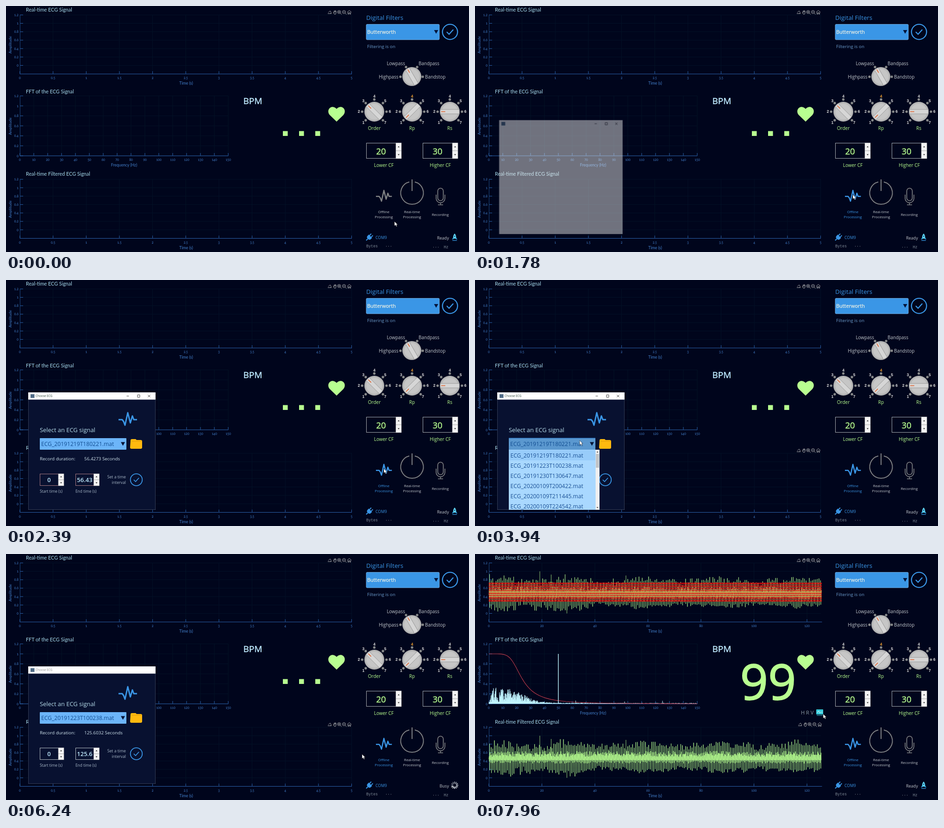
An HTML page that plays this animation: 1000x532 px, repeating every 8 s.

```html
<!DOCTYPE html>
<html lang="en">
<head>
<meta charset="utf-8">
<title>ECG monitor</title>
<style>
html, body { margin: 0; width: 100%; height: 100%; overflow: hidden; background: #00051c; }
svg { display: block; width: 100vw; height: 100vh; font-family: "Open Sans", "Noto Sans", sans-serif; }
.axis { font-family: Lato, "Noto Sans", sans-serif; font-variant-numeric: oldstyle-nums; }
.num { font: bold 8.5px "Liberation Sans", Arial, sans-serif; }
.mono { font-family: "Liberation Mono", monospace; }
#cursor { animation: cursor 8s linear infinite; }
#win { transform-origin: 185.5px 370px; animation: open 8s step-end infinite; }
#spin { transform-origin: 969px 500px; animation: spin .92s steps(12) infinite; }
#hover { animation: hover 8s step-end infinite; }
@keyframes cursor {
  0%, .8% { transform: translate(839px, 466px); }
  .9%, 2% { transform: translate(839.5px, 466.5px); }
  4.5% { transform: translate(834px, 444px); }
  8.375%, 10.3% { transform: translate(809px, 401px); }
  10.375%, 35% { transform: translate(816px, 408px); }
  38% { transform: translate(690px, 398px); }
  42% { transform: translate(380px, 366px); }
  44.5%, 49.25% { transform: translate(226px, 347px); }
  53% { transform: translate(212px, 372px); }
  58.875%, 61% { transform: translate(196px, 400px); }
  66%, 70% { transform: translate(281px, 432px); }
  73% { transform: translate(440px, 436px); }
  77%, 98.45% { transform: translate(769px, 433px); }
  98.5%, 99.45% { transform: translate(764px, 400px); }
  99.5%, 100% { transform: translate(752px, 346px); }
}
@keyframes open {
  0% { opacity: 0; transform: scale(.95); }
  22.25% { opacity: .47; transform: scale(.97); }
  23.25% { opacity: .85; transform: scale(.99); }
  24.25%, 100% { opacity: 1; transform: none; }
}
@keyframes hover {
  0% { transform: none; }
  56.5%, 100% { transform: translateY(22px); }
}
@keyframes spin { to { transform: rotate(360deg); } }
</style>
</head>
<body>
<script>
const LOOP = 8000;
const C = { blue: '#3a96e6', green: '#b8ff90', pale: '#bfeaff', gray: '#808284', text: '#c3c8cd',
            line: '#2c62ad', tick: '#4380cc', grid: '#05152a', body: '#081130' };

let seed = 7;
const rnd = () => (seed = (seed * 16807) % 2147483647) / 2147483647;
const range = (n, fn) => Array.from({ length: n }, (_, i) => fn(i)).join('');

const text = (x, y, s, size, fill = C.text, anchor = 'start', more = '') =>
  `<text x="${x}" y="${y}" font-size="${size}" fill="${fill}" text-anchor="${anchor}" xml:space="preserve" ${more}>${s}</text>`;
const mid = (x, y, s, size, fill, more) => text(x, y, s, size, fill, 'middle', more);
const heavy = (color, w) => `stroke="${color}" stroke-width="${w}"`;
const path = (d, stroke, w = 1, more = '') =>
  `<path d="${d}" fill="none" stroke="${stroke}" stroke-width="${w}" ${more}/>`;
const rect = (x, y, w, h, fill, more = '') =>
  `<rect x="${x}" y="${y}" width="${w}" height="${h}" fill="${fill}" ${more}/>`;
const circle = (x, y, r, fill, more = '') => `<circle cx="${x}" cy="${y}" r="${r}" fill="${fill}" ${more}/>`;
const at = (x, y, s, k = 1) => `<g transform="translate(${x} ${y}) scale(${k})">${s}</g>`;
// spans: "from-to from-to" in ms
const show = (spans, s) => `<g data-show="${spans}">${s}</g>`;

// Plots
const yAxis = (top, bottom, zero, unit, right) => path(`M30.5 ${top}V${bottom}`, C.line) +
  range(7, i => {
    const y = zero - unit * i * .2;
    return path(`M31 ${y}H${right}`, C.grid, .8) + path(`M30 ${y}h7`, C.line) +
      text(27, y + 2.5, +(i * .2).toFixed(1), 7, C.tick, 'end');
  }) + mid(0, 0, 'Amplitude', 8.3, C.tick, `transform="translate(12 ${(top + bottom) / 2 + 1}) rotate(-90)"`);
const xAxis = (top, bottom, right, n, step, dx) => path(`M30 ${bottom}H${right}`, C.line) +
  range(n, i => {
    const x = 30 + dx * i;
    return path(`M${x} ${top}V${bottom}`, C.grid, .8) + path(`M${x} ${bottom}v-6`, C.line) +
      mid(x, bottom + 11, +(i * step).toFixed(1), 7, C.tick);
  });
const title = (y, s) => text(43, y, s, 10.8, '#a9dcec');

const timeAxes = (top, title_, changeAt) => title(top - 7.3, title_) +
  yAxis(top, top + 128, top + 109.5, 91, 747) +
  show(`0-${changeAt}`, xAxis(top, top + 128, 747, 11, .5, 71.65)) +
  show(`${changeAt}-${LOOP}`, xAxis(top, top + 128, 749.5, 7, 20, 114.5)) +
  mid(389, top + 151, 'Time (s)', 8.8, C.tick);

function ecg(zero) {
  let d = '';
  for (let x = 30; x < 747; x += 3.47) {
    const wild = x < 230 ? .14 : .03;
    const swell = .03 * Math.sin(x / 26) + .02 * Math.sin(x / 9);
    const peak = .85 + swell - .16 * rnd() + (rnd() - .5) * wild;
    const dip = .16 - swell + .1 * rnd() - rnd() * wild;
    const wave = [.44, .5 + .08 * rnd(), .4 - .06 * rnd(), peak, dip, .54 + .1 * rnd(), .42];
    wave.forEach((v, i) => d += `${d ? 'L' : 'M'}${(x + i * .5).toFixed(1)} ${(zero - 91 * v).toFixed(1)}`);
  }
  return d;
}
const burst = zero => path(`M140 ${zero - 40}V${zero - 91}M198.5 ${zero - 40}V${zero}M164.5 ${zero - 40}V${zero - 84}M326 ${zero - 40}V${zero - 82}`, C.green, .8);

function rawSignal() {
  let bars = '';
  for (let x = 30.5; x < 749; x += 2.3) bars += `M${x.toFixed(1)} 62V103`;
  const rows = range(6, i => `M30 ${62.5 + i * 8}H749`);
  return path(ecg(128.5), C.green, .75) + burst(128.5) +
    path(bars, '#f00808', 1.4, 'stroke-dasharray="4 1.2"') +
    path(rows, '#f00808', 1.1, 'stroke-dasharray="3 1.2"') +
    path('M30 82.5H749M30 92H749', '#c4d860', 1, 'opacity=".85"') +
    path('M30 80H749', '#9ccc60', 4, 'stroke-dasharray=".7 2.77" opacity=".7"');
}

function spectrum() {
  const hump = (f, c, w, h) => h * Math.exp(-(((f - c) / w) ** 2));
  let d = 'M30 323', curve = '';
  for (let f = 0; f <= 150; f += .1) {
    const env = hump(f, 3.6, 1.3, .38) + hump(f, 5.6, .9, .22) + hump(f, 1.5, .6, .18) +
      (f > 7.5 ? hump(f, 10, 14, .21) + hump(f, 21, 14, .09) : .02) + .008 + .02 * Math.exp(-f / 50);
    d += `L${(30 + f * 3).toFixed(1)} ${(323.5 - 108 * env * (.12 + .95 * rnd() ** 2.6)).toFixed(1)}V323.5`;
  }
  for (let f = 0; f <= 150; f += 1.5)
    curve += `${f ? 'L' : 'M'}${30 + f * 3} ${(324 - 108 / Math.sqrt(1 + (f / 20) ** 6)).toFixed(1)}`;
  return path(d, '#c2f5ff', .8) + path('M217.5 324V317M323 324V319M405 324V317.5', '#c2f5ff') +
    path(curve, '#c23c4c', 1.1) + path('M180 324V216', '#c2f5ff', 1.4);
}

const toolbar = (x, y) => at(x, y, path(
  'M-4 3H4M-3 1L1-3L3 0M3 3V0' +
  'M8 0L10 4H13L14.5-1M9.5 1V-3M11 0V-4M12.5 0V-4M14-1V-3' +
  'M23 2L26 5M18.5-.5H22.5M20.5-2.5V1.5M33.5 2L36.5 5M29-.5H33' +
  'M38 0L42.5-4L47 0M39.5 0V4H41.5V1H43.5V4H45.5V0', '#a6a8aa', 1) +
  circle(20.5, -.5, 3.4, 'none', 'stroke="#a6a8aa"') + circle(31, -.5, 3.4, 'none', 'stroke="#a6a8aa"'));

// Controls
const check = (x, y, r) => circle(x, y, r, 'none', `stroke="${C.blue}" stroke-width="${r / 7}"`) +
  at(x, y, path('M-7 0L-2 5L7-5', C.blue, 2.2), r / 16);
const dot = (x, y) => circle(x, y, 2.6, '#8b8d8f', 'stroke="#55585c" stroke-width=".7"');
const knob = (x, y, r, angle) => circle(x, y, r, 'url(#metal)') +
  `<g transform="translate(${x} ${y}) rotate(${angle})">` +
  rect(-4.7, -r + 1, 9.4, 2 * r - 2, '#d6d6d6', 'stroke="#8e8e8e" stroke-width=".8"') +
  path(`M0 ${3 - r}V${-r / 2 + 1}`, '#e2622c', 1.5) + '</g>';
const dial = (x, name, value, hot) => knob(x, 228.5, 21.5, value * 45 - 180) +
  range(7, i => {
    const a = (i - 3) * Math.PI / 4, sx = Math.sin(a), cy = Math.cos(a);
    return dot(x + 26.3 * sx, 228.5 - 26.3 * cy) +
      mid(x + 33.5 * sx, 231.3 - 33 * cy, i + 1, 8.5, hot && i === 3 ? '#f0a030' : '#dadada', 'class="num"');
  }) + mid(x, 268, name, 10, C.green);
const stepper = (x, y, w, h) => rect(x, y, w, h, '#f4f4f4', 'stroke="#aaa" stroke-width=".6"') +
  path(`M${x} ${y + h / 2}h${w}`, '#999', .8) +
  at(x + w / 2, y + h / 2, `<path d="M-2 ${1 - h / 4}L0 ${-h / 4 - 1.5}L2 ${1 - h / 4}ZM-2 ${h / 4 - 1}L0 ${h / 4 + 1.5}L2 ${h / 4 - 1}Z" fill="#222"/>`);
const field = (x, y, w, h, stroke) => rect(x + .5, y + .5, w, h, 'none', `stroke="${stroke}"`) + stepper(x + w, y, 12, h + 1);
const arrow = (x, y, fill) => `<path d="M${x - 4.5} ${y - 4}h9l-4.5 8z" fill="${fill}"/>`;
const pulse = (x, y, k, color) => at(x, y, path('M0 16H8L11 20L14 28L20 1L25.5 23L30 8L33 16H40', color, 3, 'stroke-linejoin="round"'), k);
const cutoff = (x, value, name) => field(x, 296, 64, 33, '#a8acb0') +
  mid(x + 32, 320.5, value, 18.5, C.green, heavy(C.green, .4)) + mid(x + 38, 347.5, name, 10, C.green);
const offline = (color, label) => pulse(799, 398, .86, color) +
  mid(816, 448, 'Offline', 7.8, label) + mid(816, 459, 'Processing', 7.8, label);

const ready = text(931, 504.5, 'Ready', 9, C.text) + at(969, 500,
  `<path d="M0-8Q4-4 3 3H-3Q-4-4 0-8Z" fill="#5fd4f4"/><path d="M-3 0L-6 5L-2 4ZM3 0L6 5L2 4Z" fill="#2c9fdc"/>` +
  path('M-5 7H5', '#2c7fc0', 1.6) + circle(0, -2, 1.2, '#0a4070'));
const busy = text(936.5, 504.5, 'Busy', 9, C.text) + `<g id="spin">` +
  range(12, i => path('M969 496.5V492', '#eef2f6', 1.9, `transform="rotate(${i * 30} 969 500)" opacity="${.4 + i * .055}"`)) + '</g>';

const mono = (x, y, s) => text(x, y, s, 8.4, '#7d8894', 'start', 'class="mono"');
const panel = text(778, 29.5, 'Digital Filters', 13.3, C.blue) +
  rect(778, 39.5, 158, 33.5, C.blue, 'rx="2" stroke="#8cc0ec" stroke-width=".7"') +
  text(780, 60, 'Butterworth', 10.9, '#f0f2e4', 'start', heavy('#f0f2e4', .25)) + arrow(929, 56, '#04143a') + check(959, 56, 16.3) +
  text(780, 90.5, 'Filtering is on', 9.8, '#6c9ccc') +
  text(862, 128, 'Lowpass', 9.9, C.text, 'end') + text(891, 128, 'Bandpass', 9.9) +
  text(847.5, 157, 'Highpass', 9.9, C.text, 'end') + text(905, 157, 'Bandstop', 9.9) +
  dot(864, 132) + dot(888, 132) + dot(852, 153) + dot(900, 153) + knob(876.5, 152.5, 20.5, -30) +
  dial(795.5, 'Order', 3) + dial(877, 'Rp', 1, true) + dial(958.5, 'Rs', 2) +
  cutoff(778, 20, 'Lower CF') + cutoff(900, 30, 'Higher CF') +
  show('0-1380', offline(C.gray, C.text)) + show(`1380-${LOOP}`, offline(C.blue, C.blue)) +
  path('M871 380.5A24.5 24.5 0 1 0 883 380.5M877 375V400', C.gray, 2) +
  mid(877, 448, 'Real-time', 7.8) + mid(877, 459, 'Processing', 7.8) +
  rect(932.5, 394, 12, 27, 'none', `rx="6" stroke="${C.gray}" stroke-width="1.7"`) +
  path('M929 408V416A9.5 9.5 0 0 0 948 416V408M938.5 425V430M933 430H944', C.gray, 1.6) +
  mid(938, 453.5, 'Recording', 7.8) +
  at(785, 500, `<g transform="rotate(45)"><path d="M-5-3H5V1Q5 5 0 5T-5 1Z" fill="${C.blue}"/>` +
    path('M-2.5-3V-8M2.5-3V-8M0 5V10', C.blue, 2) + '</g>') +
  text(798, 503.5, 'COM9', 8.6, C.blue) +
  mono(778, 522, 'Bytes') + mono(819, 522, '···') + mono(921, 524, '···') + mono(945.5, 524, 'Hz') +
  show('0-980 1380-5480 7260-8000', ready) + show('980-1380 5480-7260', busy);

const heart = `<path d="M714 250L699.5 236C690 225 703 211 714 222.5C725 211 738 225 728.5 236Z" fill="${C.green}"/>`;
const bpm = text(512.5, 212, 'BPM', 19, C.pale, 'start', heavy(C.pale, .45)) + heart +
  show('0-7180', range(3, i => rect(598 + i * 35, 270.5, 10.5, 10.5, C.green))) +
  show('7180-8000', mid(633, 314.5, 99, 106, C.green, heavy(C.green, 2)) +
    text(704, 347, 'H R V', 11, '#8c9aa2') + rect(737, 336, 15, 11, '#35c8d8', 'rx="1"') +
    path('M738 342h3l1.5-3 2 5 1.5-2h5', '#e8ffff', .9) + path('M738 349H751', '#2aa6b8', 1.2));

// Dialog
const files = ['20191219T180221', '20191223T100238', '20191230T130647', '20200109T200422', '20200109T211445', '20200109T224542']
  .map(s => `ECG_${s}.mat`);
const windowButtons = path('M260.5 251h5M284 248.5h5v5h-5zM306.5 248.5l5 5M311.5 248.5l-5 5', '#333', .9);
const record = (name, duration, end, stroke) => text(76, 359, name, 12.1, '#124e92') +
  text(169, 389.5, `${duration} Seconds`, 9.85, '#d0e4ee') +
  field(73, 419, 40, 25, stroke) + mid(93, 436.5, 0, 13, C.pale, 'font-weight="600"') +
  field(150, 419, 39.5, 25, stroke) + mid(170, 436.5, end, 13, C.pale, 'font-weight="600"');
const list = rect(73, 367, 196, 130, '#a9d8ff') +
  `<g id="hover">${rect(73, 368, 187, 22, '#98ccfa')}</g>` +
  files.map((s, i) => text(76.5, 384 + 22 * i, s, 12.1, '#1c5296')).join('') +
  rect(260.5, 367, 8, 130, '#f0f0f0') + rect(261, 376, 7, 30, '#c2c4c6') +
  `<path d="M262.5 373l2-2.5 2 2.5zM262.5 491l2 2.5 2-2.5z" fill="#444"/>`;
const dialog = rect(48, 243, 275, 254, '#f0f0f0') +
  show('1940-6480', rect(48, 243, 275, 16, '#fff')) + rect(53, 247, 8.5, 8, '#4f6b86') +
  show('1780-5640', windowButtons) +
  show('1940-5640', text(64, 253.3, 'Choose ECG', 6.4, '#2c4438')) + show('5640-6480', text(64, 253.3, 'Choose ECG', 6.4, '#8c8c8c')) +
  show('2390-6480', rect(48.5, 259, 274, 237.5, C.body, 'stroke="#222c48" stroke-width=".8"') +
    pulse(243, 286, 1, C.blue) + text(73, 329, 'Select an ECG signal', 12.9, '#b6dcea') +
    rect(73, 342, 187, 25, '#6cb5f9', 'rx="1"') +
    show('3620-4860', rect(73, 342, 187, 25, '#5b98cf') + path('M73 342H260', '#2f7fd0', 1.2)) +
    arrow(252.5, 354.5, '#061436') +
    `<path d="M269 347q0-3 3-3h8l2 2h9q3 0 3 3v13q0 3-3 3h-20q-3 0-3-3z" fill="#ffb90f"/>` + path('M272 348.5H293', '#e09a08', 1) +
    text(73, 389.5, 'Record duration:', 9.85, '#d0e4ee') +
    show('2390-4860', record(files[0], '56.4273', '56.43', '#a87880')) +
    show('4860-6480', record(files[1], '125.6032', '125.6', '#b4bcc2')) +
    text(73, 460, 'Start time (s)', 8.3, '#a8b8c8') + text(150, 460, 'End time (s)', 8.3, '#a8b8c8') +
    text(259, 429, 'Set a time', 8.7, '#a8b8c8', 'end') + text(259, 440.5, 'interval', 8.7, '#a8b8c8', 'end') +
    check(281.5, 432, 12.8) + show('3620-4860', list));

document.body.innerHTML = `<svg viewBox="0 0 1000 532" preserveAspectRatio="none">
<defs><radialGradient id="metal"><stop offset=".75" stop-color="#c6c6c6"/><stop offset="1" stop-color="#a9a9a9"/></radialGradient></defs>
${rect(0, 0, 1000, 532, '#00051c')}
<g class="axis">
${timeAxes(19, 'Real-time ECG Signal', 6950)}
${title(189.3, 'FFT of the ECG Signal')}${yAxis(194, 324, 324, 108, 480)}${xAxis(194, 324, 480, 16, 10, 30)}
${mid(255, 347, 'Frequency (Hz)', 8.6, C.tick)}
${timeAxes(374.5, 'Real-time Filtered ECG Signal', 7100)}
</g>
${show('6950-8000', rawSignal())}
${show('6480-8000', spectrum())}
${show('7100-8000', path(ecg(484), C.green, .85) + burst(484))}
${toolbar(699, 13.5)}${show('2960-7100', toolbar(699, 368.5))}${show('7100-8000', toolbar(702, 368.5))}
${bpm}${panel}
${show('1780-6480', `<g id="win">${dialog}</g>`)}
<g id="cursor"><path d="M0 0V9.500L2.300 7.500L4 11L5.600 10.200L4 6.900H7Z" fill="#fff" stroke="#111" stroke-width=".5"/></g>
</svg>`;

// One stepped keyframe rule for each distinct set of spans
const rules = new Map();
for (const el of document.querySelectorAll('[data-show]')) {
  const spans = el.dataset.show;
  if (!rules.has(spans)) {
    const keys = spans.split(' ').map(s => {
      const [from, to] = s.split('-').map(ms => ms / LOOP * 100);
      return `${from}%{opacity:1}` + (to < 100 ? `${to}%{opacity:0}` : '100%{opacity:1}');
    }).join('');
    const name = 'show' + rules.size;
    rules.set(spans, name);
    const style = document.head.appendChild(document.createElement('style'));
    style.textContent = `@keyframes ${name}{${spans.startsWith('0-') ? '' : '0%{opacity:0}'}${keys}}`;
  }
  el.style.animation = `${rules.get(spans)} 8s step-end infinite`;
}
</script>
</body>
</html>
```
